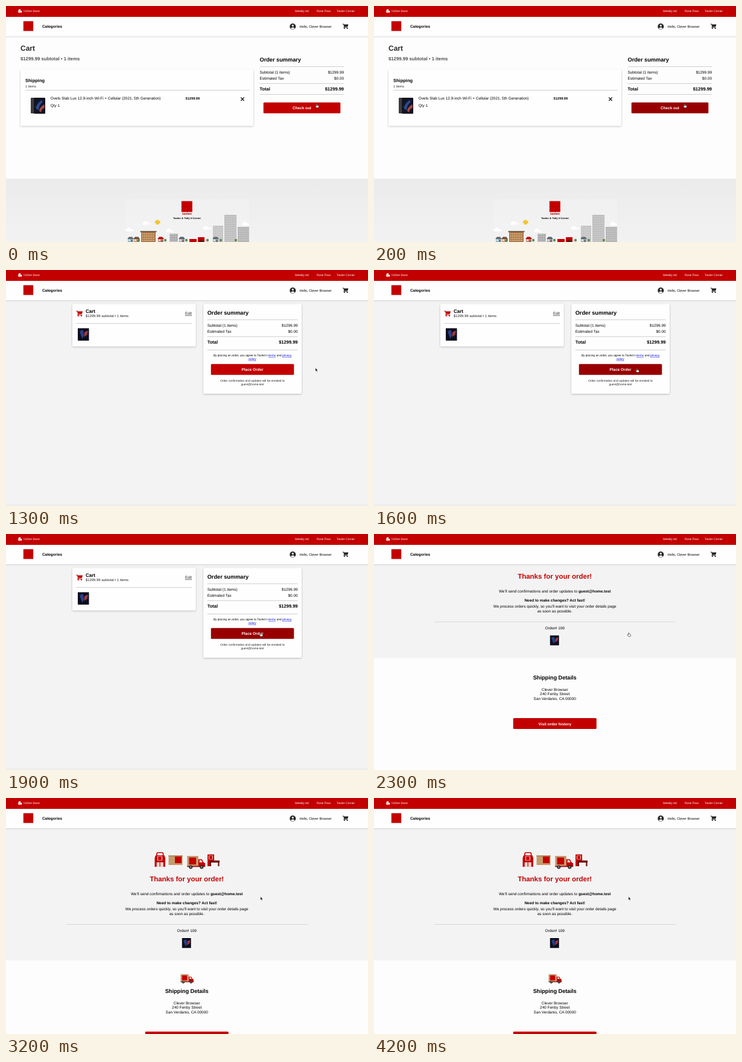
An HTML page for the animation above (4300 ms loop, 600 by 391 pixels).

```html
<!DOCTYPE html>
<html lang="en">
<head>
<meta charset="utf-8">
<title>Checkout</title>
<style>
  html, body { margin: 0; width: 100%; height: 100%; overflow: hidden; background: #fdfdfd; }
  svg { display: block; width: 100vw; height: 100vh; }
  text { font-family: "Liberation Sans", Arial, sans-serif; text-rendering: geometricPrecision; white-space: pre; }
  .b { font-weight: bold; }
  .link { fill: #0000e0; text-decoration: underline; }
</style>
</head>
<body>
<svg id="stage" viewBox="0 0 600 391" xmlns="http://www.w3.org/2000/svg"></svg>
<script>
const RED = '#c30000', DARK = '#980000', INK = '#000', LOOP = 4300;

const rect = (x, y, w, h, fill, extra = '') =>
  `<rect x="${x}" y="${y}" width="${w}" height="${h}" fill="${fill}" ${extra}/>`;
const circle = (x, y, r, fill) => `<circle cx="${x}" cy="${y}" r="${r}" fill="${fill}"/>`;
const path = (d, fill, extra = '') => `<path d="${d}" fill="${fill}" ${extra}/>`;
const text = (x, y, size, str, { bold, anchor = 'start', fill = INK, extra = '' } = {}) =>
  `<text x="${x}" y="${y}" font-size="${size}" fill="${fill}" text-anchor="${anchor}" ${bold ? 'class="b"' : ''} ${extra}>${str}</text>`;
const bold = (x, y, size, str, options) => text(x, y, size, str, { ...options, bold: true });
const mid = { anchor: 'middle' }, end = { anchor: 'end' };
const rule = (x1, x2, y, color = '#d0d0d0') => rect(x1, y, x2 - x1, 1, color);
const card = (x, y, w, h) => rect(x, y, w, h, '#fefefe', 'rx="2" filter="url(#shadow)"');
const group = (id, body, transform = '') => `<g id="${id}" transform="${transform}">${body}</g>`;
const place = (x, y, scale, body) => `<g transform="translate(${x} ${y}) scale(${scale})">${body}</g>`;
const button = (id, x, y, w, label) =>
  rect(x - .3, y - .2, w + .6, 18, RED, `rx="1.5" id="${id}"`) +
  bold(x + w / 2, y + 11.3, 6.4, label, { anchor: 'middle', fill: '#fff' });

const cartIcon = color =>
  path('M0 .2H2L2.5 1.2H10L8.5 5.2H3.6L3.2 6.1H9V7H2.2Q1.6 6.6 2 5.8L2.6 4.8 1.3 1.1H0Z', color) +
  circle(3.1, 8, .95, color) + circle(8, 8, .95, color);

const header = () =>
  rect(-5, 10, 610, 39.8, '#fefefe', 'filter="url(#softShadow)"') +
  rect(0, 0, 600, 18, RED) +
  path('M20.3 6.5H22V5.2H24V7.8H26.2V11H20.3Z', '#fff') +
  rect(21.2, 8, 1, 1, RED) + rect(23.2, 8.8, 1, 1, RED) +
  text(29, 9.9, 4.85, 'Online Store', { fill: '#fff' }) +
  text(479, 9.9, 4.85, 'Weekly Ad', { fill: '#fff' }) +
  text(515, 9.9, 4.85, 'Rose Pass', { fill: '#fff' }) +
  text(548, 9.9, 4.85, 'Tavlen Corner', { fill: '#fff' }) +
  rect(28.8, 25.2, 16.4, 16.2, RED) +
  bold(60, 36.2, 6.4, 'Categories') +
  circle(475.3, 34, 5, '#222') + circle(475.3, 32.4, 1.6, '#fff') +
  path('M472 36.9Q475.3 33.6 478.6 36.9Q475.3 40 472 36.9Z', '#fff') +
  text(486.5, 35.9, 5.5, 'Hello, Clever Browser') +
  place(557.8, 29.3, .98, cartIcon('#222'));

const summary = (x, right, y, height) =>
  bold(x, y, 9.2, 'Order summary') + rule(x, right, y + 8) +
  text(x, y + 20.3, 6.38, 'Subtotal (1 items)') + text(right, y + 20.3, 6.38, '$1299.99', end) +
  text(x, y + 29.8, 6.38, 'Estimated Tax') + text(right, y + 29.8, 6.38, '$0.00', end) +
  rule(x, right, y + 36) +
  bold(x, y + 48, 7.5, 'Total') + bold(right, y + 48, 7.5, '$1299.99', end) +
  rule(x, right, y + height);

const tablet =
  rect(41, 152, 13, 26, '#3a3c42', 'rx="1.2"') +
  rect(46.5, 152, 18.5, 26.5, '#0c0d11', 'rx="1.2"') +
  rect(47.8, 153.3, 16, 24, '#12142a') +
  path('M49 169Q52 160 59 156L61 159Q55 163 54 173Z', '#2a4a8c') +
  path('M55 174Q56 167 63.8 163V169Q59 170 58 176Z', '#b0483c');

const thumb = (x, y, w, h) => place(x, y, 1,
  rect(0, 0, w, h, '#0c0d1c') +
  path(`M${w * .15} ${h * .25}L${w * .45} ${h * .12} ${w * .58} ${h * .55} ${w * .4} ${h * .85}Z`, '#24408a') +
  path(`M${w * .6} ${h * .3}L${w * .92} ${h * .2} ${w * .85} ${h * .5} ${w * .58} ${h * .72}Z`, '#a8333c'));

const cloud = (x, y, w, fill = '#fff') =>
  rect(x - w / 2, y - 1, w, 3.2, fill, 'rx="1.6"') + circle(x - w * .1, y - .8, w * .23, fill);

const tower = (x, y, w, wall, pane, gap = 3) => {
  let out = rect(x, y, w, 391 - y, wall);
  for (let py = y + 2.5; py < 390; py += gap + .6)
    for (let px = x + 2; px < x + w - 1.5; px += gap) out += rect(px, py, 1.4, 1.9, pane);
  return out;
};

const house = (x, wall, roof) =>
  rect(x, 385, 9, 6, wall) + path(`M${x - 1} 386L${x + 2} 382.5H${x + 7}L${x + 10} 386Z`, roof) +
  rect(x + 1.5, 387, 2, 2, '#fff') + rect(x + 5.5, 387, 2, 4, '#705b52');

const skyline = () =>
  rect(198, 320, 205, 71, '#f4f4f4', 'opacity=".6"') +
  [[205, 371, 13], [233, 360, 13], [271, 372, 12], [333, 368, 13], [397, 361, 12]].map(c => cloud(...c)).join('') +
  path('M247 356H249V354.5H253V356H255.5V360H253.5V362H249V360H247Z', '#f5c32c') +
  tower(362, 346, 20, '#bdbdbd', '#d6d6d6') +
  tower(343, 364, 17, '#c4c4c4', '#dcdcdc') +
  tower(384, 366, 19, '#b5b5b5', '#d0d0d0') +
  tower(271, 377, 14, '#c0c0c0', '#888') +
  tower(224, 374, 24, '#ad7748', '#f0d5a7') + rect(222.5, 372.8, 27, 1.8, '#66503f') +
  house(202, '#9bbac6', '#5d6670') + house(212, '#c7a27d', '#70483b') +
  house(252, '#c98a80', RED) + house(287, '#9fb2bc', '#56616b') + house(343, '#a1b7c0', '#5d6670') +
  rect(304, 386, 12, 5, RED) + rect(318, 383, 11, 8, RED) + rect(320, 387.5, 7, 3.5, '#5a1515') +
  [220, 264, 299, 334, 356, 381].map(x => circle(x, 388, 2.2, '#668954')).join('') +
  rect(290.8, 323.3, 18, 18, RED) +
  bold(300, 346.2, 5.5, 'tavlen', { anchor: 'middle', fill: RED }) +
  bold(300, 353, 4.2, 'Tavlen &amp; Tally it Corner', mid);

const cartPage = () =>
  rect(0, 50, 600, 341, '#fdfdfd') + rect(0, 286, 600, 105, 'url(#foot)') + skyline() +
  bold(24, 73.8, 12, 'Cart', { fill: '#2b2b2b' }) +
  bold(24, 89.8, 7.75, '$1299.99 subtotal • 1 items', { fill: '#505050' }) +
  card(24, 105.5, 386, 93) +
  bold(32, 125.8, 7.5, 'Shipping') + text(32, 134.6, 5.6, '1 items', { fill: '#333' }) + rule(32, 404, 139) +
  tablet +
  text(73.7, 155.3, 6.38, 'Ovelo Slab Lux 12.9-inch Wi-Fi + Cellular (2021, 5th Generation)') +
  text(73.7, 166.6, 6.38, 'Qty 1') + bold(297.6, 154.8, 5.65, '$1299.99') +
  path('M389.2 151.5L394.7 157M394.7 151.5L389.2 157', 'none', 'stroke="#111" stroke-width="1.2"') +
  summary(420.5, 560, 92, 54) +
  button('checkOut', 427, 160, 127, 'Check out');

const checkoutPage = () =>
  rect(0, 50, 600, 341, '#f3f3f3') + rect(0, 388.5, 600, 2.5, '#ececec') +
  rect(0, 388.8, 115, 1, '#d2d2d2', 'id="status"') +
  card(110, 56.5, 204.5, 70) +
  place(116.3, 67.2, 1.1, cartIcon(RED)) +
  bold(132, 70.5, 8, 'Cart') +
  text(132, 78.4, 5.88, '$1299.99 subtotal • 1 items', { fill: '#222' }) +
  text(308, 74.4, 6.4, 'Edit', { anchor: 'end', fill: '#222', extra: 'text-decoration="underline"' }) +
  rule(116, 308, 88) + thumb(119, 96.5, 18.5, 20.5) +
  card(327.3, 56.5, 162.7, 148.5) + summary(333.7, 483.5, 74, 58) +
  text(408.5, 143.2, 4.87, 'By placing an order, you agree to Tavlen\'s <tspan class="link">terms</tspan> and <tspan class="link">privacy</tspan>', mid) +
  text(408.5, 148.9, 4.87, '<tspan class="link">policy</tspan>', mid) +
  button('placeOrder', 340, 156, 137, 'Place Order') +
  text(408.5, 185.2, 4.87, 'Order confirmation and updates will be emailed to', { anchor: 'middle', fill: '#222' }) +
  text(408.5, 190.8, 4.87, 'guest@home.test', { anchor: 'middle', fill: '#222' });

const truck =
  rect(0, 0, 18.5, 17, '#c69a6d') + rect(3.2, 2.6, 11.5, 11.5, RED) +
  path('M18.5 5.5H24.5L27 10.5 29.8 12V18H18.5Z', RED) + path('M20.3 7H23.7L25.3 10.7H20.3Z', '#f3d9d4') +
  rect(0, 16.5, 29.8, 1.8, '#8d1111') +
  [6, 24].map(x => circle(x, 18.4, 2.9, '#2b2b2b') + circle(x, 18.4, 1.1, '#bbb')).join('');

const deliveryIcons = () =>
  path('M250 96V92.5Q250 90.5 252 90.5H258.5Q260.5 90.5 260.5 92.5V96', 'none', `stroke="${RED}" stroke-width="1.7"`) +
  path('M248 95H262.5L264 99V114H246.5V99Z', RED) + rect(251, 96.5, 8, 7, '#efe8e4') + rect(252, 97.2, 6, 5.6, RED) +
  rect(249.7, 106.5, 11, 7.5, '#ead9d2') + rect(254.5, 106.5, 1.2, 7.5, RED) +
  rect(269.5, 95, 23, 16, '#c69a6d') + rect(269.5, 95, 23, 2, '#b28459') + rect(280, 97, 11, 11, RED) +
  place(300.3, 96, 1, truck) +
  path('M334 93.5H345V103.5H354V107H353V113H351.5V107H338V113H334Z', RED) +
  rect(336, 95.5, 7, 6, '#f0dfdc') + rect(337, 96, 5, 5, RED) +
  rect(337, 104.2, 17, 2.5, '#611515') + rect(351.5, 106, 2, 7, '#611515') + rect(338, 106, 2, 7, '#611515');

const thanksPage = () =>
  rect(0, 50, 600, 341, '#fdfdfd') + rect(0, 50, 600, 219, '#f3f3f3', 'id="hero"') +
  group('icons', deliveryIcons() + place(289.5, 292, .72, truck)) +
  group('thanks',
    bold(299.7, 73.5, 11.48, 'Thanks for your order!', { anchor: 'middle', fill: RED }) +
    text(299.7, 96.8, 6.42, 'We’ll send confirmations and order updates to <tspan class="b">guest@home.test</tspan>', mid) +
    bold(299.7, 112, 6.42, 'Need to make changes? Act fast!', mid) +
    text(299.7, 122.2, 6.42, 'We process orders quickly, so you’ll want to visit your order details page', mid) +
    text(299.7, 129.8, 6.42, 'as soon as possible.', mid) +
    rule(100, 500, 145, '#d8d8d8') + text(299.7, 158, 6.42, 'Order# 109', mid) +
    rect(290.5, 167, 17.5, 18.5, '#fff') + thumb(291.7, 168, 15, 16.5)) +
  group('shipping',
    bold(299.7, 240.5, 9.2, 'Shipping Details', mid) +
    ['Clever Browser', '240 Fenby Street', 'San Verdanio, CA 00000']
      .map((line, i) => text(299.7, 259.8 + i * 7.6, 6.42, line, mid)).join('') +
    button('history', 231, 305.2, 137.5, 'Visit order history'));

const cursors =
  group('arrow', path('M0 0V5.6L1.3 4.4 2.3 6.6 3.3 6.2 2.3 4H4.1Z', '#111', 'stroke="#fff" stroke-width=".45"')) +
  group('hand', path('M-.6 .5Q0 -.3 .6 .5V2.3L2.9 2.9Q3.6 3.2 3.4 4.2L2.8 6.3H-.3L-2.3 3.8Q-2.1 2.9 -1.2 3.3L-.6 3.8Z',
    '#fff', 'stroke="#222" stroke-width=".6"'));

const dropShadow = (id, opacity) =>
  `<filter id="${id}" x="-10%" y="-15%" width="120%" height="135%">
    <feDropShadow dx="0" dy="1" stdDeviation="1.7" flood-color="#000" flood-opacity="${opacity}"/>
  </filter>`;

const stage = document.getElementById('stage');
stage.innerHTML = `<defs>${dropShadow('shadow', .25)}${dropShadow('softShadow', .14)}
  <linearGradient id="foot" x1="0" y1="0" x2="0" y2="1">
    <stop offset="0" stop-color="#ebebeb"/><stop offset="1" stop-color="#f2f2f2"/>
  </linearGradient></defs>` +
  group('cart', cartPage()) + group('checkout', checkoutPage()) + group('done', thanksPage()) +
  header() + cursors;

const el = id => document.getElementById(id);
const show = (id, on) => el(id).setAttribute('display', on ? 'inline' : 'none');
const move = (id, x, y) => el(id).setAttribute('transform', `translate(${x} ${y})`);
const clamp = v => Math.min(1, Math.max(0, v));
const easeInOut = p => p < .5 ? 4 * p ** 3 : 1 - 4 * (1 - p) ** 3;
const mixRed = p => `rgb(${195 - 43 * p},0,0)`;

function draw(time) {
  const t = Math.floor(time / 100) * 100;
  show('cart', t < 600);
  show('checkout', t >= 600 && t < 2300);
  show('done', t >= 2300);
  show('status', t < 800);

  // The delivery pictures push the text down once they have loaded.
  const loaded = t >= 2400;
  show('icons', loaded);
  el('hero').setAttribute('height', loaded ? 219 : 155.5);
  move('thanks', 0, loaded ? 64 : 0);
  move('shipping', 0, loaded ? 82 : 0);

  const glide = easeInOut(clamp((t - 1200) / 600));
  const x = 514.6 - 92.8 * glide, y = 162.3 + 1.2 * glide;
  const overPlace = x < 477 && t < 2300;
  el('checkOut').setAttribute('fill', mixRed(clamp(t / 200)));
  el('placeOrder').setAttribute('fill', overPlace ? DARK : RED);

  const pointing = t < 600 || overPlace || (t >= 2300 && !loaded);
  show('hand', pointing);
  show('arrow', !pointing);
  move('hand', x + .4, y);
  move('arrow', x, y);
}

const start = performance.now();
function tick() {
  draw((performance.now() - start) % LOOP);
  requestAnimationFrame(tick);
}
tick();
</script>
</body>
</html>
```
